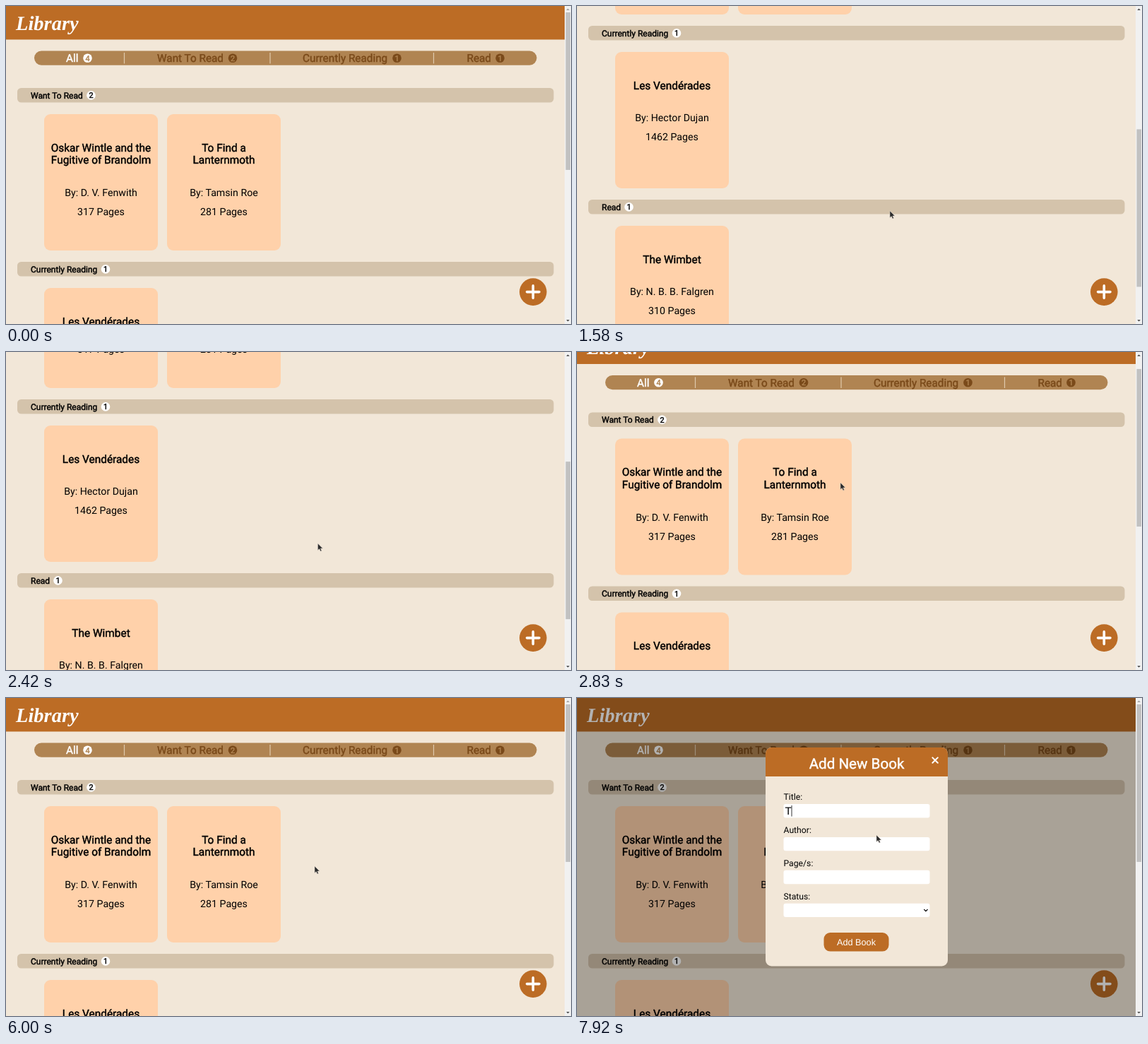
Write an HTML page that moves like this. It is 800 px wide and 450 px high and loops after 8000 ms.

```html
<!DOCTYPE html>
<html lang="en">
<head>
<meta charset="utf-8">
<title>Library</title>
<style>
  html, body { margin: 0; width: 100%; height: 100%; overflow: hidden; background: #f2e7d8; }
  svg { display: block; width: 800px; height: 450px; font-family: Roboto, sans-serif; text-rendering: geometricPrecision; }
  .bold { stroke: currentColor; stroke-width: .45px; }
  .logo { font: italic bold 28.5px "Liberation Serif", serif; }
  .field { font-family: "Liberation Sans", sans-serif; }
</style>
</head>
<body>
<svg id="stage" viewBox="0 0 800 450"></svg>
<script>
const LOOP = 8000, FPS = 12;
const ORANGE = '#bc6c25', PAPER = '#f2e7d8', TAB = '#b08452', DARK = '#7a4a1a', BAR = '#d4c3ab', CARD = '#ffd1aa';

const shelves = {
  want: { name: 'Want To Read', badge: 120.5, books: [
    { title: ['Oskar Wintle and the', 'Fugitive of Brandolm'], author: 'D. V. Fenwith', pages: 317 },
    { title: ['To Find a', 'Lanternmoth'], author: 'Tamsin Roe', pages: 281 }] },
  current: { name: 'Currently Reading', badge: 141, books: [
    { title: ['Les Vendérades'], author: 'Hector Dujan', pages: 1462 }] },
  read: { name: 'Read', badge: 73.5, books: [
    { title: ['The Wimbet'], author: 'N. B. B. Falgren', pages: 310 }] }
};
const tabs = [
  { id: 'all', name: 'All', x: 85, badge: 115.5, count: 4 },
  { id: 'want', name: 'Want To Read', x: 214, badge: 321, count: 2 },
  { id: 'current', name: 'Currently Reading', x: 420, badge: 553.5, count: 1 },
  { id: 'read', name: 'Read', x: 652.5, badge: 699.5, count: 1 }
];

// Timelines: [tick, value, ...], one tick is 1/12 s
const scrollKeys = [[11, 0], [19, 334], [21, 422], [26, 422], [29, 295], [34, 30.5], [36, 0]];
const modalKeys = [[80, 0], [82, 1]];
const viewKeys = [[0, 'all'], [42, 'want'], [50, 'current'], [58, 'read'], [68, 'all']];
const cursorKeys = [
  [11, 620, 335], [16, 455, 297], [19, 443, 290], [23, 443, 290], [29, 441.5, 271], [34, 373, 185],
  [36, 335, 130], [37, 335, 130], [41, 270, 76], [44, 262, 72], [47, 262, 72], [50, 471, 74],
  [51, 473, 74], [57, 684, 72], [65, 684, 72], [66, 490, 42], [67, 220, 48], [68, 108, 68],
  [69, 108, 68], [72, 437, 238], [76, 437, 238], [79, 745, 402], [80, 745, 402], [83, 438, 216],
  [85, 438, 216], [88, 418, 158], [93, 418, 158], [95, 424, 194]
];

function at(keys, n) {
  const i = keys.findIndex(k => k[0] > n);
  if (i < 0) return keys[keys.length - 1].slice(1);
  if (i === 0) return keys[0].slice(1);
  const a = keys[i - 1], b = keys[i], p = (n - a[0]) / (b[0] - a[0]);
  return a.slice(1).map((v, j) => v + (b[j + 1] - v) * p);
}

const rect = (x, y, w, h, fill, r = 0) =>
  `<rect x="${x}" y="${y}" width="${w}" height="${h}" rx="${r}" fill="${fill}"/>`;
const circle = (x, y, r, fill) => `<circle cx="${x}" cy="${y}" r="${r}" fill="${fill}"/>`;
const line = (d, color, width) =>
  `<path d="${d}" fill="none" stroke="${color}" stroke-width="${width}" stroke-linecap="round"/>`;
const text = (s, x, y, size, { fill = '#000', cls = '', mid = false } = {}) =>
  `<text x="${x}" y="${y}" font-size="${size}" fill="${fill}" color="${fill}" class="${cls}"` +
  `${mid ? ' text-anchor="middle"' : ''}>${s}</text>`;
const badge = (n, x, y, back, fill) =>
  circle(x, y, 6.3, back) + text(n, x, y + 3.9, 10.8, { fill, cls: 'bold', mid: true });

function tabBar(view) {
  const items = tabs.map(t => {
    const on = t.id === view, color = on ? '#fff' : DARK;
    return text(t.name, t.x, 79, 15.3, { fill: color, cls: 'bold' }) + badge(t.count, t.badge, 73.8, color, TAB);
  });
  const dividers = [167.5, 374, 605.5].map(x => rect(x - .6, 66, 1.2, 15.5, '#dfcaad'));
  return rect(40, 63.5, 711.5, 20.2, TAB, 10.1) + dividers.join('') + items.join('');
}

function card(book, x, y) {
  const mid = x + 80.5, shift = (book.title.length - 1) * 17.8;
  return rect(x, y, 161, 193, CARD, 9) +
    book.title.map((s, i) => text(s, mid, y + 52.6 + i * 17.6, 15.4, { cls: 'bold', mid: true })).join('') +
    text('By: ' + book.author, mid, y + 98.4 + shift, 14.2, { mid: true }) +
    text(book.pages + ' Pages', mid, y + 125.3 + shift, 14.2, { mid: true });
}

function shelf({ name, badge: bx, books }, i) {
  const y = 116 + i * 246;
  return rect(16, y, 759.5, 20.5, BAR, 5.5) + text(name, 35, y + 14.6, 12, { cls: 'bold' }) +
    badge(books.length, bx, y + 10.4, '#fff', '#000') +
    books.map((b, j) => card(b, 54 + j * 174, y + 37)).join('');
}

function page(view, scroll) {
  const shown = view === 'all' ? Object.values(shelves) : [shelves[view]];
  return `<g transform="translate(0 ${-scroll})">` + rect(0, 0, 791, 47.5, ORANGE) +
    text('Library', 14, 33.5, 28.5, { fill: '#fff', cls: 'logo' }) + tabBar(view) +
    shown.map(shelf).join('') + '</g>';
}

const addButton = () => circle(746.3, 404.6, 19.3, ORANGE) +
  line('M737.6 404.6h17.4M746.3 395.9v17.4', '#fff', 3.6);

function scrollBar(view, scroll) {
  const ratio = 432 / (view === 'all' ? 872 : 625);
  const up = scroll > 0 ? '#505050' : '#a3a3a3';
  return rect(791, 0, 9, 450, '#f1f1f1') + rect(792.5, 9 + scroll * ratio, 6.5, 450 * ratio, '#c1c1c1') +
    `<path d="M793.3 6l2.3-2.6 2.3 2.6z" fill="${up}"/><path d="M793.3 444l2.3 2.6 2.3-2.6z" fill="#505050"/>`;
}

function modal(k, n) {
  if (!k) return '';
  const fields = ['Title:', 'Author:', 'Page/s:', 'Status:'].map((s, i) =>
    text(s, 292.5, 144.2 + i * 46.9, 12.2) + rect(292.5, 150 + i * 46.9, 207, 19.4, '#fff', 3)).join('');
  const typed = n >= 94, caret = n >= 88;
  return rect(0, 0, 791, 450, `rgba(0,0,0,${.3 * k})`) +
    `<g transform="translate(396 225) scale(${k}) translate(-396 -225)">` +
    rect(267, 70, 258, 309.5, PAPER, 8.5) +
    `<path d="M267 111V78.5a8.5 8.5 0 0 1 8.5-8.5h241a8.5 8.5 0 0 1 8.5 8.5V111z" fill="${ORANGE}"/>` +
    text('Add New Book', 396, 100, 20.6, { fill: '#fff', cls: 'bold', mid: true }) +
    line('M503.4 84.4l7.4 7.4m0-7.4l-7.4 7.4', '#fff', 2) + fields +
    (typed ? text('T', 294.5, 164.8, 15.2, { cls: 'field' }) : '') +
    (caret ? rect(typed ? 303.6 : 294.5, 152, .8, 15.6, '#000') : '') +
    line('M491.6 299.4l2.3 2.3 2.3-2.3', '#000', 1.3) +
    rect(349.5, 332, 92, 26.6, ORANGE, 9) +
    text('Add Book', 395.5, 349.8, 12.7, { fill: '#fff', cls: 'field', mid: true }) + '</g>';
}

function pointer(n) {
  if (n < 6) return '';
  const [x, y] = at(cursorKeys, n);
  return `<path transform="translate(${x} ${y})" d="M0 0V9.6L2.2 7.6 3.8 11 5.4 10.2 3.9 7H7Z" ` +
    'fill="#2b2b2b" stroke="#d8d0c8" stroke-width=".5"/>';
}

const stage = document.getElementById('stage');
let last = -1;

function draw() {
  const ms = performance.now() % LOOP;
  const n = Math.min(Math.floor((ms + 4) * FPS / 1000), LOOP * FPS / 1000 - 1);
  if (n !== last) {
    last = n;
    const [scroll] = at(scrollKeys, n), [k] = at(modalKeys, n);
    const view = viewKeys.filter(v => v[0] <= n).pop()[1];
    stage.innerHTML = rect(0, 0, 800, 450, PAPER) + page(view, scroll) + addButton() +
      modal(k, n) + scrollBar(view, scroll) + pointer(n);
  }
  requestAnimationFrame(draw);
}
draw();
</script>
</body>
</html>
```
